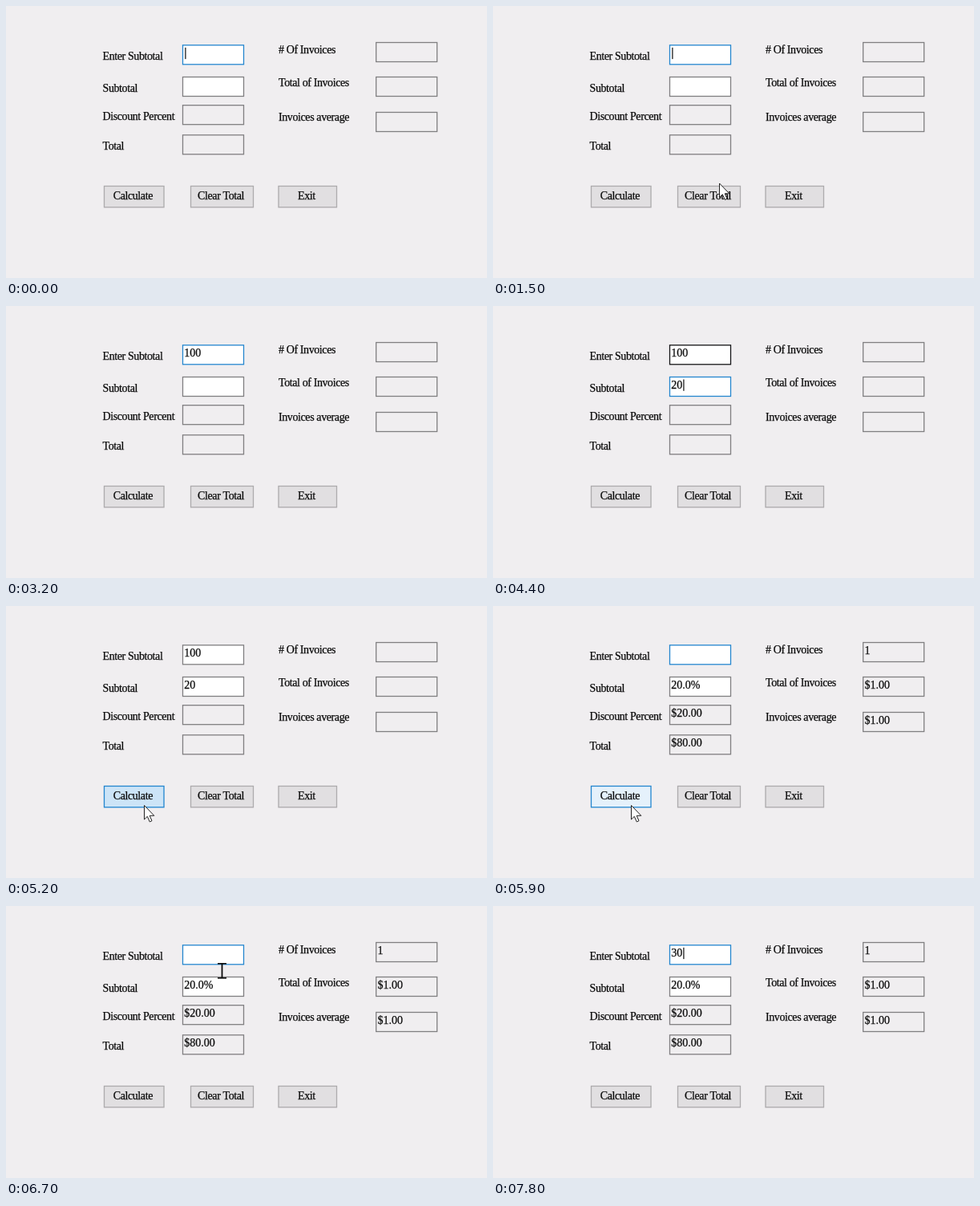
Recreate the animation shown at these times as an HTML page with a canvas. Size 600 px wide and 339 px high, loop 8000 ms.

```html
<!DOCTYPE html>
<html lang="en">
<head>
<meta charset="utf-8">
<title>Invoice form</title>
<style>
html, body { margin: 0; overflow: hidden; background: #f0eef0; }
canvas { display: block; }
</style>
</head>
<body>
<canvas id="stage" width="600" height="339"></canvas>
<script>
const ctx = document.getElementById('stage').getContext('2d');
const LOOP = 8000, STEP = 100, KEY_TIME = 50;
const TAB = 3500, PRESS = 5200, RELEASE = 5300;
const BG = '#f0eef0', INK = '#0c0c0c';
const GRAY = [128, 127, 129], BLUE = [36, 134, 206], BLACK = [20, 20, 22];

const field = (label, labelX, labelY, x, y, result) =>
  ({ label, labelX, labelY, x, y, w: 77, h: 25, result });
const leftField = (label, y, result) => field(label, 120.5, y + 19, 220, y, result);
const rightField = (label, labelY, y, result) => field(label, 340, labelY, 461.2, y, result);
const button = (label, x, w) => ({ label, x, y: 224, w, h: 27.3 });

const fields = [
  leftField('Enter Subtotal', 48.3, ''),
  leftField('Subtotal', 88, '20.0%'),
  leftField('Discount Percent', 123.2, '$20.00'),
  leftField('Total', 160.3, '$80.00'),
  rightField('# Of Invoices', 58.5, 45, '1'),
  rightField('Total of Invoices', 99.5, 88, '$1.00'),
  rightField('Invoices average', 143, 132, '$1.00')
];
const [entry, rate] = fields;
const buttons = [
  button('Calculate', 122, 75.5), button('Clear Total', 230, 79), button('Exit', 339.5, 73.5)
];

// Pointer stops: arrival time, travel time, x, y
const stops = [
  [800, 0, 226, 147], [1100, 200, 272, 66], [1500, 100, 282, 221], [2100, 500, 237, 63],
  [5000, 400, 170, 257], [5200, 200, 172, 248.5], [6300, 400, 405, 27],
  [6700, 400, 264, 71], [6800, 100, 272, 66]
];
// Times at which visibility flips
const pointerFlips = [800, 2800, 3500, 4300, 4700, 7700];
const caretFlips = [2500, 2800, 3200, 3500, 4100, 4300, 5200, 6800, 7200, 7500];

const flipped = (flips, t) => flips.filter(f => f <= t).length % 2 === 1;
const inside = (r, p) => p.x >= r.x && p.x <= r.x + r.w && p.y >= r.y && p.y <= r.y + r.h;
const clamp = k => Math.min(1, Math.max(0, k));
const mix = (a, b, k) => a.map((v, i) => v + (b[i] - v) * k);
const rgb = c => `rgb(${c.join()})`;
const typed = (text, start, t) =>
  text.slice(0, Math.max(0, Math.floor((t - start) / KEY_TIME / 2 * 2 / 2) + 1));

function pointerAt(t) {
  let [, , x, y] = stops[0];
  for (const [arrival, travel, toX, toY] of stops.slice(1)) {
    const k = clamp((t - arrival + travel) / travel);
    const eased = (1 - Math.cos(Math.PI * k)) / 2;
    [x, y] = mix([x, y], [toX, toY], eased);
  }
  return { x, y };
}

function textOf(f, t) {
  if (f === entry && t >= RELEASE) return typed('30', 7700, t);
  if (t >= RELEASE) return f.result;
  if (f === entry) return typed('100', 2700, t < 2800 ? 0 : t);
  return f === rate ? typed('20', 4300, t) : '';
}

function box({ x, y, w, h }, fill, border) {
  ctx.fillStyle = fill;
  ctx.fillRect(x, y, w, h);
  ctx.strokeStyle = border;
  ctx.lineWidth = 1.3;
  ctx.strokeRect(x + 0.5, y + 0.5, w - 1, h - 1);
}

function write(text, x, y, spacing = -0.4, align = 'left') {
  ctx.font = '14px "Liberation Serif", serif';
  ctx.letterSpacing = spacing + 'px';
  ctx.textAlign = align;
  ctx.fillStyle = ctx.strokeStyle = INK;
  ctx.lineWidth = 0.25;
  ctx.fillText(text, x, y);
  ctx.strokeText(text, x, y);
}

function drawField(f, t, pointer) {
  const focused = f === (t >= TAB && t < PRESS ? rate : entry) && !(t >= PRESS && t < RELEASE);
  const fade = clamp((t - TAB + STEP) / 500);
  let border = focused ? BLUE : GRAY;
  if (f === rate && focused) border = mix(GRAY, BLUE, fade);
  if (f === entry && !focused && inside(f, pointer)) border = mix(BLUE, BLACK, fade);
  const text = textOf(f, t);

  write(f.label, f.labelX, f.labelY);
  box(f, f === entry || f === rate ? '#fff' : BG, rgb(border));
  write(text, f.x + 2.3, f.y + 14.8, 0);
  if (focused && !flipped(caretFlips, t)) {
    ctx.fillRect(f.x + 3.3 + ctx.measureText(text).width, f.y + 3.5, 1.2, 14.3);
  }
}

function drawButton(b, t, pointer) {
  const hot = t >= stops[0][0] && inside(b, pointer);
  const pressed = t >= PRESS && t < RELEASE;
  const fill = !hot ? '#e1dfe1' : pressed ? '#cce4f7' : '#e5f1fb';
  box(b, fill, hot ? rgb(BLUE) : '#adabad');
  write(b.label, b.x + b.w / 2 - 1.4, b.y + 17.3, -0.4, 'center');
}

function drawPointer({ x, y }, isText) {
  ctx.save();
  ctx.translate(x, y);
  if (isText) {
    ctx.fillStyle = INK;
    ctx.fillRect(0, 0, 11, 1.6);
    ctx.fillRect(0, 18, 11, 1.6);
    ctx.fillRect(4.6, 0, 1.8, 19);
  } else {
    const arrow = new Path2D('M0.5 0V17.5L4.3 13.8L7.3 20.5L10 19.2L7.2 12.8H12.8Z');
    ctx.fillStyle = '#fff';
    ctx.strokeStyle = '#222';
    ctx.lineWidth = 1;
    ctx.fill(arrow);
    ctx.stroke(arrow);
  }
  ctx.restore();
}

function draw(t) {
  const pointer = pointerAt(t);
  ctx.fillStyle = BG;
  ctx.fillRect(0, 0, 600, 339);
  fields.forEach(f => drawField(f, t, pointer));
  buttons.forEach(b => drawButton(b, t, pointer));
  if (flipped(pointerFlips, t)) drawPointer(pointer, fields.some(f => inside(f, pointer)));
}

const start = performance.now();
function tick() {
  const t = (performance.now() - start) % LOOP;
  draw(Math.floor(t / STEP) * STEP);
  requestAnimationFrame(tick);
}
tick();
</script>
</body>
</html>
```
